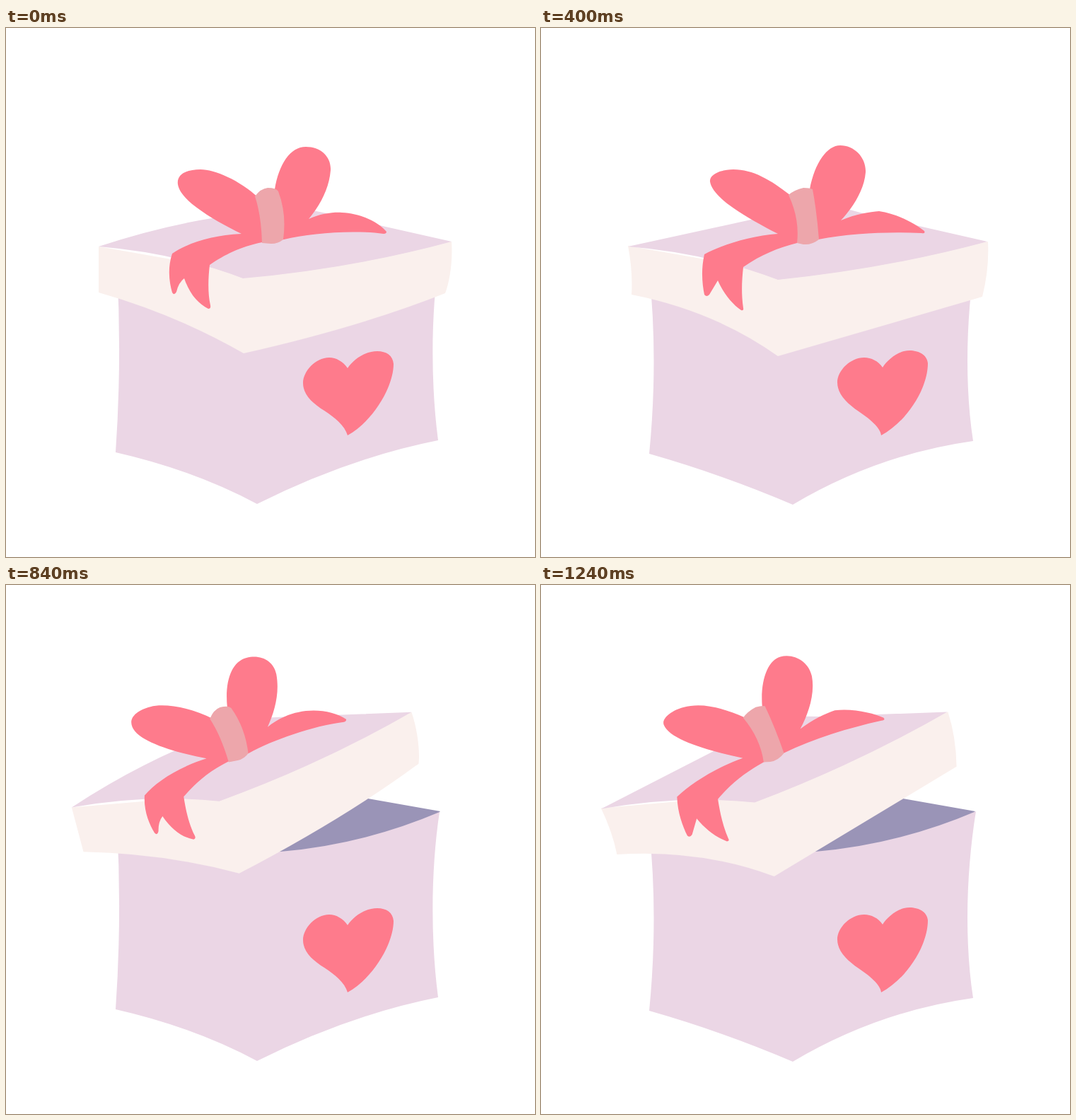
These frames come from a looping animation (748x748 px, 1.68 s). An HTML page:

```html
<!DOCTYPE html>
<html lang="en">
<head>
<meta charset="utf-8">
<title>Gift box</title>
<style>
  html, body { margin: 0; width: 100%; height: 100%; overflow: hidden; background: #fff; }
  svg { display: block; width: 100%; height: 100%; }
  .lilac { fill: #ebd6e5; }
  .cream { fill: #faf0ed; }
  .pink { fill: #fe7b8c; }
  .knot { fill: #eda6ab; }
  .inside { fill: #9a94b7; }
</style>
</head>
<body>
<svg viewBox="0 0 748 748">
  <path class="inside" d="M400 283L512 302L614 320L560 370L380 380Z"/>

  <g id="bodyA">
    <path class="lilac" d="M157 340L330 379L388 377Q505 367 613 321C601 400 600 500 611 583Q485 608 355 673Q265 625 155 600Q164 470 157 340Z"/>
    <path class="pink" d="M483 481C477 472 467 466 457 466C437 466 420 486 420 502C420 519 434 531 450 541C465 551 479 562 483 576C518 557 548 508 548 475C547 463 538 457 525 457C507 457 491 469 483 481Z"/>
  </g>
  <g id="bodyB">
    <path class="lilac" d="M153 345L330 379L388 377Q505 367 615 320C602 400 598 500 611 584Q476 603 356 674Q258 632 153 602Q166 470 153 345Z"/>
    <path class="pink" d="M483 480C477 471 467 466 457 466C437 466 419 485 419 501C419 518 433 531 449 542C464 552 480 565 481 576C517 557 547 510 547 474C546 462 534 456 521 456C505 456 490 469 483 480Z"/>
  </g>

  <g id="lidA">
    <path class="cream" d="M131 309L335 345L630 302C632 330 627 360 621 375Q500 423 336 460Q240 405 131 374Z"/>
    <path class="lilac" d="M131 309Q215 281 297 268L415 254L453 262L630 302Q490 340 335 354Q240 318 131 309Z"/>
    <path class="pink" d="M357 240C330 215 295 200 275 200C255 200 241 207 243 221C246 243 290 270 333 291C290 293 255 305 235 319C228 340 231 360 235 374Q238 379 241 373Q244 360 252 354C260 377 272 390 286 397Q290 397 289 392C285 375 286 352 288 335C310 320 330 310 362 303L393 299C430 290 490 285 534 291Q538 291 538 288C525 273 500 262 475 261C465 260 445 262 428 270C443 252 457 228 459 201C460 182 445 168 424 168C402 168 386 192 380 228Z"/>
    <path class="knot" d="M352 238Q360 227 370 226Q382 226 385 231Q397 262 392 299Q385 305 375 305L362 304Q361 265 352 238Z"/>
  </g>
  <g id="lidB">
    <path class="cream" d="M123 308L335 345L632 302Q634 340 624 380L335 464Q245 400 128 377Q130 345 123 308Z"/>
    <path class="lilac" d="M123 309L297 271L415 251L455 262L631 302Q490 340 335 356Q235 318 123 309Z"/>
    <path class="pink" d="M352 236C325 215 300 200 272 200C255 200 238 207 239 217C242 240 290 268 335 291C295 294 255 307 231 320C226 342 228 362 231 377Q234 381 238 377L250 357C258 375 270 390 283 399Q287 400 286 396C283 375 284 357 286 338C312 320 335 311 362 304L392 299C440 290 490 288 538 290Q544 291 542 287C530 277 505 263 478 259C465 260 445 263 424 272C440 255 457 230 459 204C460 183 443 166 423 166C405 166 387 190 380 228Z"/>
    <path class="knot" d="M350 236Q358 229 371 226Q380 226 384 228Q390 260 393 299Q383 307 371 306L362 304Q366 270 350 236Z"/>
  </g>
</svg>
<script>
  const LOOP = 1680, BEAT = 80, TICK = 40;
  const OPEN_START = 640, OPEN_END = 840, LAST = 1240;
  const part = Object.fromEntries(
    ['bodyA', 'bodyB', 'lidA', 'lidB'].map(id => [id, document.getElementById(id)]));

  const wobble = t => Math.floor(t / BEAT) % 2 ? 'B' : 'A';

  function pose(t) {
    if (t < OPEN_START) return { body: wobble(t), lid: wobble(t), open: 0 };
    if (t < OPEN_END) {
      const step = Math.floor((t - OPEN_START) / TICK) * TICK;
      const open = (step / (OPEN_END - OPEN_START)) ** 2.15;
      return { body: step ? 'A' : 'B', lid: 'A', open };
    }
    const look = wobble(Math.min(t, LAST) - OPEN_END);
    return { body: look, lid: look, open: 1 };
  }

  function show(name, look) {
    for (const v of 'AB') part[name + v].setAttribute('visibility', v === look ? 'visible' : 'hidden');
  }

  function draw(t) {
    const { body, lid, open } = pose(t);
    show('body', body);
    show('lid', lid);
    part['lid' + lid].setAttribute('transform',
      `translate(${-46.2 * open} ${-58.4 * open}) rotate(${-14.85 * open} 380 310)`);
  }

  const start = performance.now();
  function frame() {
    draw((performance.now() - start) % LOOP);
    requestAnimationFrame(frame);
  }
  draw(0);
  requestAnimationFrame(frame);
</script>
</body>
</html>
```
